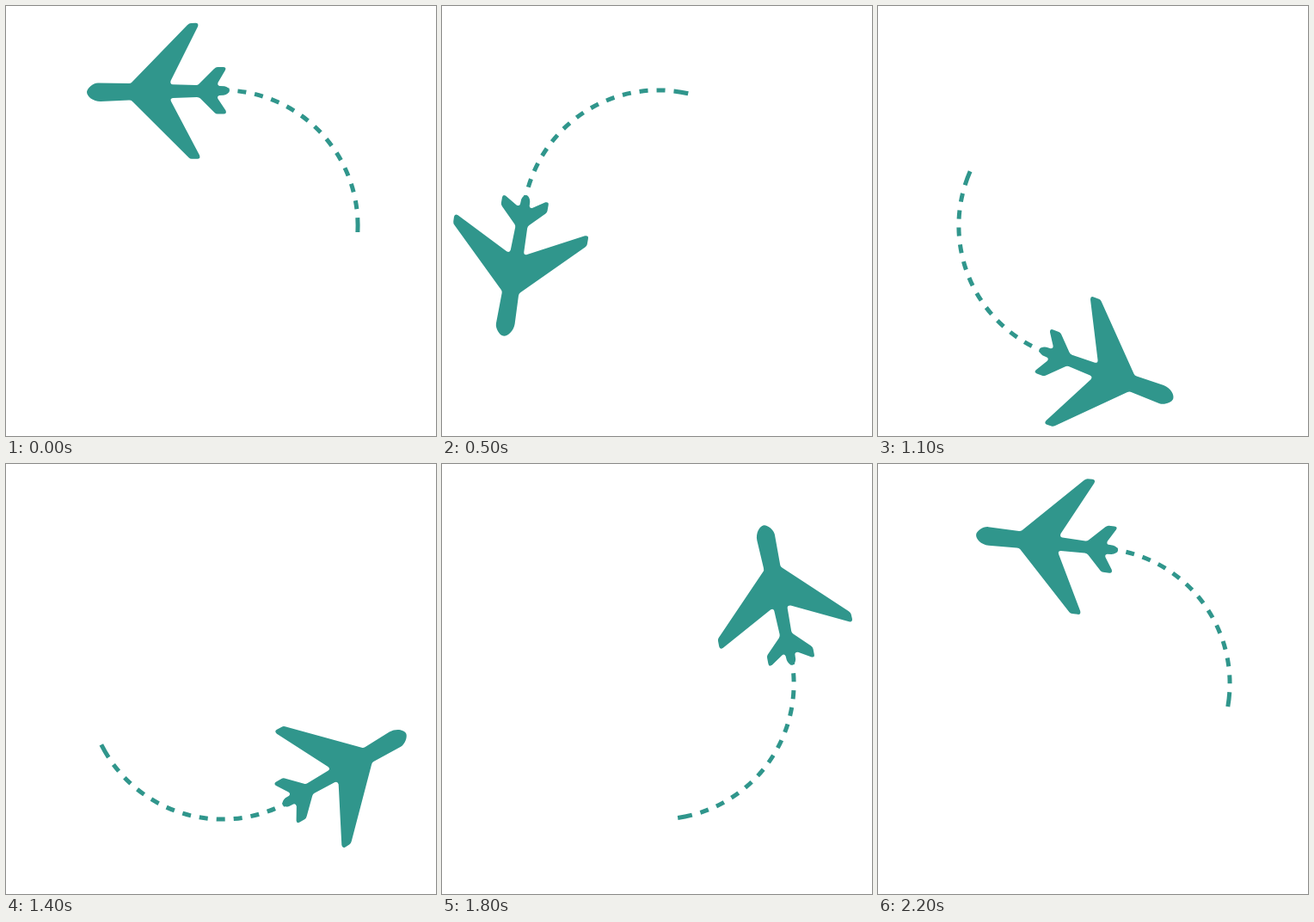
Recreate the animation shown at these times as an HTML page. Size 500 by 500 pixels, loop 2.3 s.

```html
<!DOCTYPE html>
<html lang="en">
<head>
<meta charset="utf-8">
<title>Circling plane</title>
<style>
  html, body { margin: 0; height: 100%; overflow: hidden; background: #fff; }
  svg { display: block; width: 100%; height: 100%; }
</style>
</head>
<body>
<svg viewBox="0 0 500 500">
  <g id="flight" fill="#30968c">
    <path id="trail" fill="none" stroke="#30968c" stroke-width="5"
      d="M408.9 263A157.6 157.6 0 0 0 255 97.9"/>
    <path d="M94 100C94 96 101 89.5 107 89.5L143 90Q145 90 146.500 88.500L211 22
      Q213 20 215 20L220.500 19.800Q224.500 20 223 24L191.500 87Q190.500 91 194 91.300
      L221 92Q223 92 224.500 90.500L242 73Q244 71 246 71L252.500 71Q256.500 71 255 74.500
      L246.500 89Q245.500 92.500 248.500 93L254 93.300Q259 94.500 260 98Q259 102.500 253 103.700
      L248 104Q245 105 246.500 108L255.500 121.500Q257 125.500 253 125.500L246 125.500
      Q244 125.500 242.500 124L226 107.500Q224.500 106 222 106L194 107Q190.500 107.500 192 111
      L225 173.500Q226.500 177.800 222.500 177.800L216 177.800Q214 177.800 212.500 176.300
      L147 111Q145.500 109.500 143 109.600L110 111C101 111 94 105 94 100Z"/>
  </g>
</svg>
<script>
  const LOOP = 2300, STEP = 100;
  // [step, degrees turned]: the plane slows after a quarter turn, then speeds up
  const keys = [[0, 0], [5, 80], [6, 95.3], [9, 127.2], [11, 159.1], [12, 175],
                [14, 209.5], [18, 281], [22, 353], [23, 360]];
  const flight = document.getElementById('flight');

  // One long dash at the far end, even dashes after it
  document.getElementById('trail').style.strokeDasharray = [17, ...Array(23).fill(10)].join(' ');

  function turn(step) {
    const i = keys.findIndex(([s]) => s > step);
    const [s0, a0] = keys[i - 1], [s1, a1] = keys[i];
    return a0 + (a1 - a0) * (step - s0) / (s1 - s0);
  }

  function draw() {
    const step = Math.floor(performance.now() % LOOP / STEP);
    flight.setAttribute('transform', `rotate(${-turn(step)} 251.5 255.5)`);
    requestAnimationFrame(draw);
  }
  draw();
</script>
</body>
</html>
```
